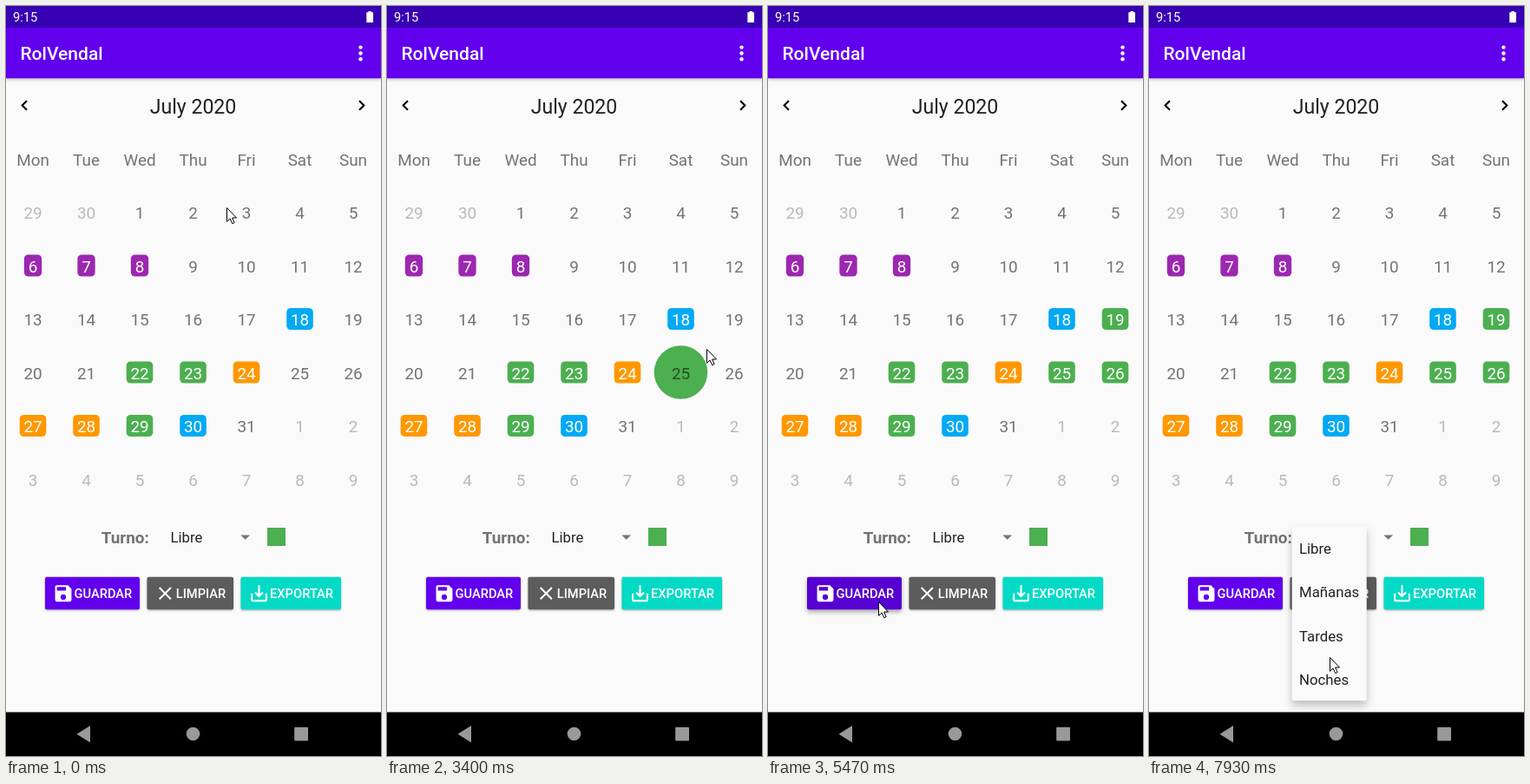
Animation, 432 px wide and 864 px high, one loop 8000 ms. Source, as an HTML page:

```html
<!DOCTYPE html>
<html lang="es">
<head>
<meta charset="utf-8">
<title>RolVendal</title>
<style>
  html, body { margin: 0; width: 100%; height: 100%; overflow: hidden; background: #fafafa; }
  svg { display: block; width: 432px; height: 864px; }
  text { font-family: Roboto, "Noto Sans", sans-serif; white-space: pre; }
  .bar { filter: drop-shadow(0 1.5px 2px rgba(0, 0, 0, .28)); }
  .button { filter: drop-shadow(0 1.5px 1.3px rgba(0, 0, 0, .32)); }
  .menu { filter: drop-shadow(0 5px 5px rgba(0, 0, 0, .26)); }
</style>
</head>
<body>
<svg id="stage" viewBox="0 0 432 864" xmlns="http://www.w3.org/2000/svg"></svg>
<script>
const stage = document.getElementById('stage');
const LOOP = 8000, TICK = 1000 / 15;
const GREEN = '#4caf50', BLUE = '#03a9f4', ORANGE = '#ff9800', PURPLE = '#9c27b0';
const SOFT = 'rgba(0,0,0,.54)', FAINT = 'rgba(0,0,0,.26)';

function add(parent, tag, attrs, content) {
  const el = document.createElementNS(stage.namespaceURI, tag);
  for (const key in attrs) el.setAttribute(key, attrs[key]);
  if (content !== undefined) el.textContent = content;
  parent.appendChild(el);
  return el;
}
const group = (parent, attrs = {}) => add(parent, 'g', attrs);
const rect = (parent, x, y, width, height, fill, rx = 0, extra = {}) =>
  add(parent, 'rect', { x, y, width, height, fill, rx, ...extra });
const circle = (parent, cx, cy, r, fill) => add(parent, 'circle', { cx, cy, r, fill });
const path = (parent, d, fill, extra = {}) => add(parent, 'path', { d, fill, ...extra });
const label = (parent, content, x, y, size, fill, weight = 400, anchor = 'start') =>
  add(parent, 'text', { x, y, fill, 'font-size': size, 'font-weight': weight, 'text-anchor': anchor }, content);
const show = (el, on) => el.setAttribute('visibility', on ? 'visible' : 'hidden');

// App bar and status bar
rect(stage, 0, 0, 432, 864, '#fafafa');
rect(stage, 0, 20, 432, 63.3, '#6200ee', 0, { class: 'bar' });
rect(stage, 0, 0, 432, 25, '#3700b3');
label(stage, '9:15', 8, 18, 14.7, '#fff');
path(stage, 'M417.5 6h3.5v1.2h2V19h-7.7V7.2h2.2z', '#fff');
label(stage, 'RolVendal', 16.5, 62.3, 21, '#fff', 500);
for (const y of [47.6, 54.5, 61.3]) circle(stage, 408.5, y, 2.2, '#fff');

// Month header
const chevron = { stroke: '#000', 'stroke-width': 2.1 };
path(stage, 'M24 109.2l-5.3 5.3 5.3 5.3', 'none', chevron);
path(stage, 'M407 109.2l5.3 5.3-5.3 5.3', 'none', chevron);
label(stage, 'July 2020', 215.5, 124, 23.1, '#212121', 400, 'middle');

// Calendar
const colX = i => 31 + i * 61.5;
const rowY = i => 237.5 + i * 61.5;
const shifts = { 6: PURPLE, 7: PURPLE, 8: PURPLE, 18: BLUE, 22: GREEN, 23: GREEN,
  24: ORANGE, 27: ORANGE, 28: ORANGE, 29: GREEN, 30: BLUE };
const tapTick = { 25: 39, 19: 59, 26: 69 };
const SAVED = 82;
const taps = [];

function dayText(parent, content, x, y, fill) {
  return label(parent, content, x, y + 7.5, 18.9, fill, 400, 'middle');
}
function badge(parent, day, x, y, color) {
  const width = day < 10 ? 20.3 : 30.6;
  rect(parent, x - width / 2, y - 12.6, width, 25.2, color, 4.8);
  dayText(parent, day, x, y, '#fff');
}

['Mon', 'Tue', 'Wed', 'Thu', 'Fri', 'Sat', 'Sun'].forEach((name, i) =>
  label(stage, name, colX(i), 183.5, 18.9, SOFT, 400, 'middle'));

for (let i = 0; i < 42; i++) {
  const x = colX(i % 7), y = rowY(Math.floor(i / 7)), day = i - 1;
  if (day < 1) dayText(stage, day + 30, x, y, FAINT);
  else if (day > 31) dayText(stage, day - 31, x, y, FAINT);
  else if (shifts[day]) badge(stage, day, x, y, shifts[day]);
  else {
    const mark = tapTick[day] && circle(stage, x, y, 30.8, GREEN);
    const text = dayText(stage, day, x, y, SOFT);
    if (mark) {
      const saved = group(stage);
      badge(saved, day, x, y, GREEN);
      taps.push({ at: tapTick[day], mark, text, saved });
    }
  }
}

// Shift selector
label(stage, 'Turno:', 109.7, 618.7, 18.9, SOFT, 700);
label(stage, 'Libre', 189.5, 618, 16.8, 'rgba(0,0,0,.87)');
const ripple = circle(stage, 275.5, 612, 20.5, '#000');
path(stage, 'M270.3 609.4h10.8l-5.4 5.4z', '#757575');
rect(stage, 301, 601, 21, 21, GREEN);

// Buttons
const icons = {
  save: 'M17 3H5c-1.1 0-2 .9-2 2v14c0 1.1.9 2 2 2h14c1.1 0 2-.9 2-2V7zM12 19a3 3 0 1 1 0-6 3 3 0 0 1 0 6zM15 9H5V5h10z',
  close: 'M19 6.4L17.6 5 12 10.6 6.4 5 5 6.4l5.6 5.6L5 17.6 6.4 19l5.6-5.6 5.6 5.6 1.4-1.4-5.6-5.6z',
  export: 'M19 12v7H5v-7H3v7c0 1.1.9 2 2 2h14c1.1 0 2-.9 2-2v-7zm-6 .7l2.6-2.6L17 11.5l-5 5-5-5 1.4-1.4 2.6 2.6V3h2z'
};
function button(x, width, color, icon, iconX, name, textX) {
  const box = rect(stage, x, 657.7, width, 37.6, color, 2.1, { class: 'button' });
  const shade = rect(stage, x, 657.7, width, 37.6, '#000', 2.1, { opacity: 0 });
  path(stage, icons[icon], '#fff', {
    transform: `translate(${iconX} 676.7) scale(1.05) translate(-12 -12)`, 'fill-rule': 'evenodd' });
  label(stage, name, textX, 682, 14.7, '#fff', 500);
  return { box, shade };
}
const save = button(45, 109, '#6200ee', 'save', 66, 'GUARDAR', 78.5);
button(162.5, 99.5, '#5c5c5c', 'close', 183.3, 'LIMPIAR', 195.7);
button(270.5, 115.5, '#03dac5', 'export', 291.5, 'EXPORTAR', 304);

// Drop-down list
const menu = group(stage);
rect(menu, 164.7, 599.5, 86, 200.7, '#fafafa', 2, { class: 'menu' });
['Libre', 'Mañanas', 'Tardes', 'Noches'].forEach((name, i) =>
  label(menu, name, 173, 630.7 + i * 50.4, 16.8, 'rgba(0,0,0,.87)'));

// Navigation bar
rect(stage, 0, 813.5, 432, 50.5, '#000');
path(stage, 'M97 829v19.5L81.5 838.7z', '#999');
circle(stage, 215.5, 838.5, 7.8, '#999');
rect(stage, 332.2, 830.7, 15.8, 15.8, '#999', 1);

// Toast
const toast = group(stage);
rect(toast, 77, 737, 277.5, 51, '#eee', 25.5, { 'fill-opacity': .9 });
label(toast, 'Valores guardados correctamente.', 215.5, 767.8, 14.7, 'rgba(0,0,0,.87)', 400, 'middle');

const cursor = path(stage, 'M.5.5V16.4L4.1 13l2.6 5.7 2.4-1.1L6.6 12h4.9z', '#fff',
  { stroke: '#000', 'stroke-width': 1 });

// Keyframes: tick followed by values
const pointer = [[1, 254, 232], [5, 285, 507], [9, 285, 507], [11, 279, 500], [14, 279, 500],
  [24, 331, 379], [26, 331, 379], [29, 334, 371], [37, 331, 418], [39, 331, 418],
  [45, 370, 390], [47, 367, 397], [50, 367, 397], [56, 386, 376], [62, 386, 376],
  [66, 383, 413], [70, 383, 413], [79, 127, 686], [82, 127, 686], [94, 273, 611],
  [103, 273, 611], [116, 214, 723], [119, 208, 750]];
const press = [[80, 0], [82, 1], [87, 0]];
const rippleFade = [[94, 0], [96, .12], [101, 0]];
const menuFade = [[96, 0], [100, 1]];
const toastFade = [[82, 0], [89, 1], [112, 1], [119, 0]];

const linear = p => p;
const smooth = p => p * p * (3 - 2 * p);

function sample(keys, tick, ease = linear) {
  const next = keys.findIndex(k => k[0] > tick);
  if (next === 0) return keys[0].slice(1);
  if (next < 0) return keys[keys.length - 1].slice(1);
  const a = keys[next - 1], b = keys[next];
  const p = ease((tick - a[0]) / (b[0] - a[0]));
  return a.slice(1).map((v, i) => v + (b[i + 1] - v) * p);
}
const fade = (el, keys, tick) => el.setAttribute('opacity', sample(keys, tick)[0]);

function draw(time) {
  // The screen refreshes 15 times a second
  const tick = Math.min(119, Math.floor((time + 4) / TICK));
  const [x, y] = sample(pointer, tick, smooth).map(Math.round);
  cursor.setAttribute('transform', `translate(${x} ${y})`);
  for (const tap of taps) {
    const done = tick >= SAVED;
    show(tap.mark, tick >= tap.at && !done);
    show(tap.text, !done);
    show(tap.saved, done);
  }
  const [down] = sample(press, tick);
  save.shade.setAttribute('opacity', down * .12);
  save.box.style.filter =
    `drop-shadow(0 ${1.5 + down * 2}px ${1.3 + down * 1.5}px rgba(0,0,0,.32))`;
  fade(ripple, rippleFade, tick);
  fade(menu, menuFade, tick);
  fade(toast, toastFade, tick);
}

const start = performance.now();
function loop() {
  draw((performance.now() - start) % LOOP);
  requestAnimationFrame(loop);
}
loop();
</script>
</body>
</html>
```
